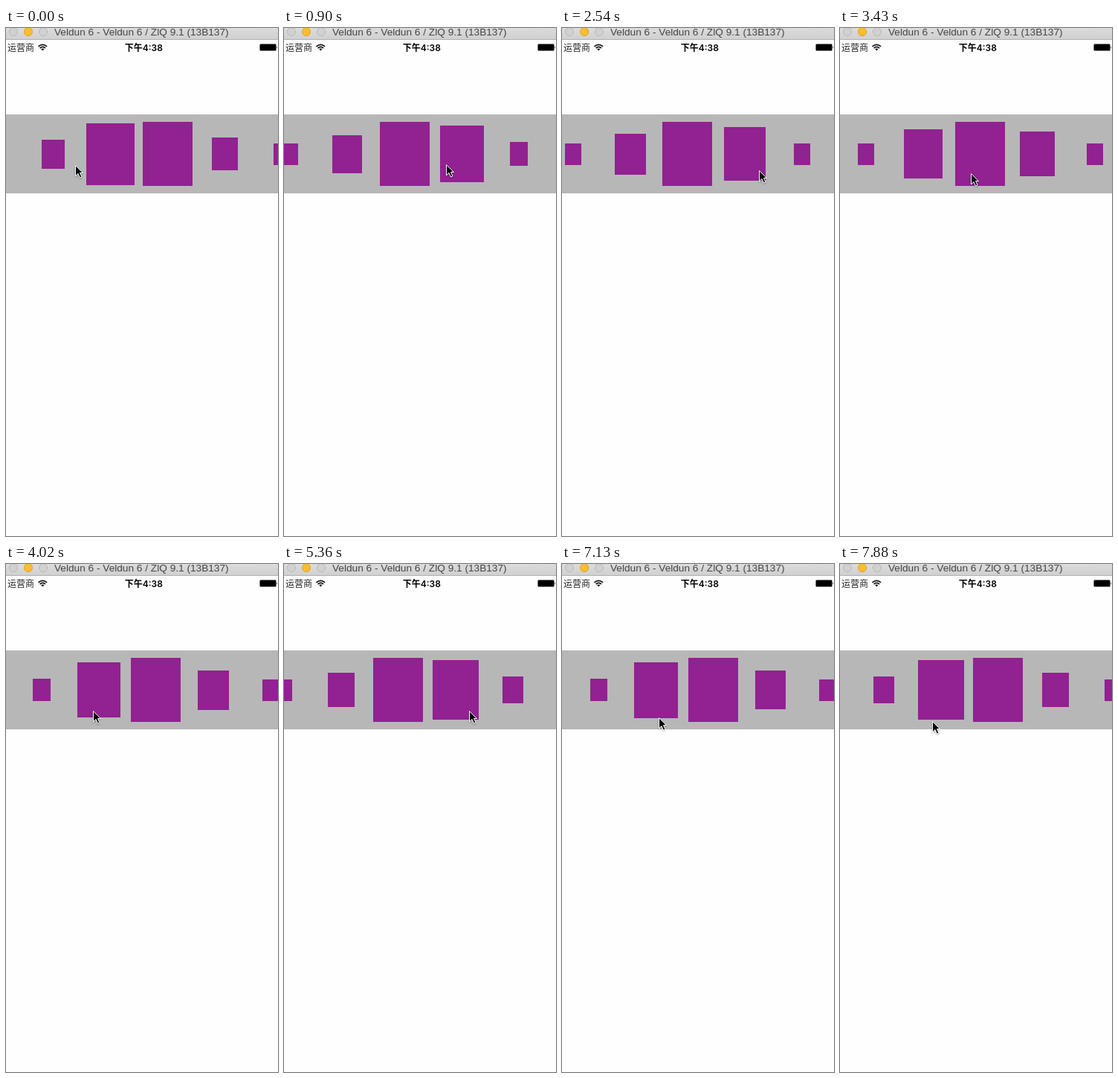
Write an HTML page that moves like this. It is 366x682 px and loops after 8 s.

```html
<!DOCTYPE html>
<html lang="zh">
<head>
<meta charset="utf-8">
<title>Elastic carousel</title>
<style>
  html, body { margin: 0; width: 100%; height: 100%; overflow: hidden; background: #fefefe; }
  svg { display: block; }
  .title { font: 13.66px "Liberation Sans", sans-serif; fill: #444; }
  .carrier { font: 12px "Noto Sans CJK SC", "Noto Sans CJK", sans-serif; fill: #222; }
  .clock { font: 600 12px Inter, "Noto Sans CJK SC", "Noto Sans CJK", sans-serif; fill: #000; }
</style>
</head>
<body>
<svg width="366" height="682" viewBox="0 0 366 682">
  <defs>
    <linearGradient id="bar" x2="0" y2="1">
      <stop stop-color="#dcdcdc"/><stop offset="1" stop-color="#d0d0d0"/>
    </linearGradient>
    <filter id="shadow" x="-50%" y="-50%" width="200%" height="200%">
      <feDropShadow dx="0" dy="1" stdDeviation="1" flood-opacity=".4"/>
    </filter>
  </defs>

  <rect width="366" height="15" fill="url(#bar)"/>
  <rect y="15" width="366" height="1" fill="#b2b2b2"/>
  <g fill="#d1d1d1" stroke="#b9b9b9">
    <circle cx="10" cy="5" r="5.5"/>
    <circle cx="30" cy="5" r="5.5" fill="#ffbd2e" stroke="#e0a02a"/>
    <circle cx="50" cy="5" r="5.5"/>
  </g>
  <text class="title" x="65" y="10">Veldun 6 - Veldun 6 / ZlQ 9.1 (13B137)</text>

  <text class="carrier" x="2" y="31">运营商</text>
  <g fill="none" stroke="#111" stroke-width="1.7">
    <path d="M43.5 24.9Q49.3 19.7 55.1 24.9M45.6 27Q49.3 23.8 53 27"/>
    <path d="M47.2 28.2Q49.3 26.6 51.4 28.2L49.3 30.6z" fill="#111" stroke="none"/>
  </g>
  <text class="clock" x="185.3" y="31" text-anchor="middle">下午4:38</text>
  <rect x="341.5" y="21.5" width="22" height="9" rx="1.5" fill="none" stroke="#000" stroke-opacity=".5"/>
  <rect x="342" y="22" width="21" height="8" rx=".6"/>
  <path d="M364.5 24.3q1.5 1.7 0 3.4z"/>

  <rect y="116" width="366" height="106" fill="#b7b7b7"/>
  <g id="cells" fill="#922191" shape-rendering="crispEdges"></g>
  <path id="cursor" d="M.5 1.6V15.8L4 12.5 6.4 18 8.9 16.9 6.5 11.5H10.4z" stroke="#fff" filter="url(#shadow)"/>
</svg>
<script>
  const LOOP = 8000, STEP = 148.6, LAST_STEP = 53;
  const COUNT = 5, SPACING = 77, MIDDLE = 183.5, CENTER_Y = 169.19;
  const POINTER_RATIO = -2;

  // Each pose leads to the next with a sideways swing of the given number of half waves.
  const poses = [
    { step: 0, first: 63.5, x: 93, y: 183, swing: -46, halves: 1 },
    { step: 10, first: 44, x: 156, y: 182, swing: 24, halves: 2 },
    { step: 17, first: 15, x: 265, y: 190, swing: 0, halves: 0 },
    { step: 27, first: 48, x: 117, y: 196, swing: -36, halves: 2 },
    { step: 36, first: 0, x: 249, y: 196, swing: 0, halves: 0 },
    { step: 41, first: 40, x: 135, y: 200, swing: 24, halves: 2 },
    { step: LAST_STEP, first: 59, x: 124, y: 210 }
  ];

  const snap = value => Math.ceil(value - 0.5);
  const cursor = document.getElementById("cursor");
  const group = document.getElementById("cells");
  const cells = Array.from({ length: COUNT }, () =>
    group.appendChild(document.createElementNS("http://www.w3.org/2000/svg", "rect")));

  function poseAt(step) {
    const next = Math.max(1, poses.findIndex(pose => pose.step >= step));
    const from = poses[next - 1], to = poses[next];
    const u = (step - from.step) / (to.step - from.step);
    const mix = key => from[key] + (to[key] - from[key]) * u;
    const offset = from.swing * Math.sin(from.halves * Math.PI * u);
    return { first: mix("first") + offset, x: mix("x") + POINTER_RATIO * offset, y: mix("y") };
  }

  function placeCell(cell, center) {
    // Cells grow towards the middle of the strip, between a third and full size.
    const width = Math.min(67, Math.max(67 / 3, 84.1 - 0.45 * Math.abs(center - MIDDLE)));
    const height = width * 86 / 67;
    const left = snap(center - width / 2), top = snap(CENTER_Y - height / 2);
    cell.setAttribute("x", left);
    cell.setAttribute("y", top);
    cell.setAttribute("width", snap(center + width / 2) - left);
    cell.setAttribute("height", snap(CENTER_Y + height / 2) - top);
  }

  function draw(now) {
    const step = Math.min(LAST_STEP, Math.floor(now % LOOP / STEP));
    const { first, x, y } = poseAt(step);
    cells.forEach((cell, i) => placeCell(cell, first + i * SPACING));
    cursor.setAttribute("transform", `translate(${Math.round(x)} ${Math.round(y)})`);
  }

  const start = performance.now();
  function tick() {
    draw(performance.now() - start);
    requestAnimationFrame(tick);
  }
  tick();
</script>
</body>
</html>
```
